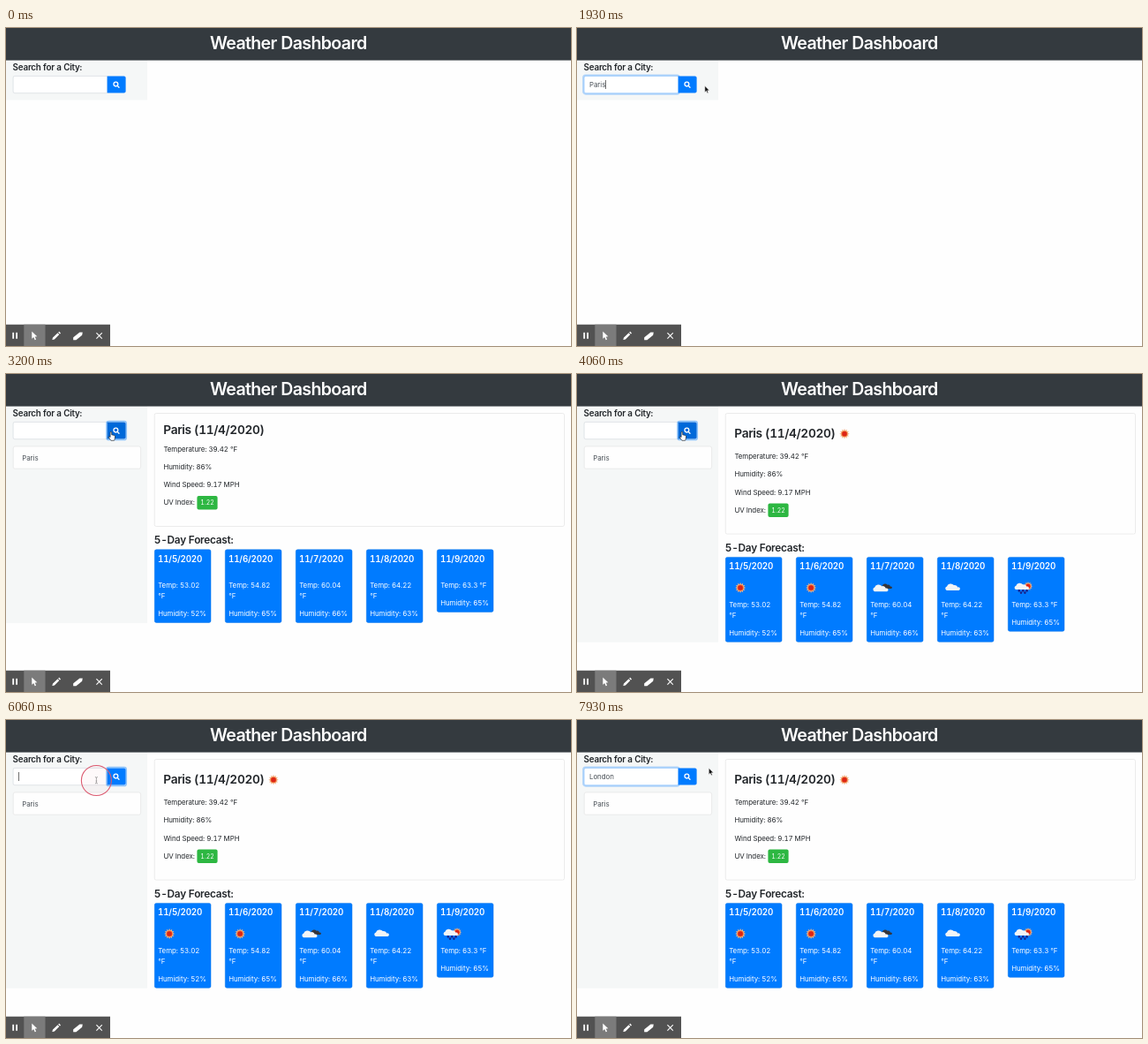
An HTML page that plays this animation: 640 px wide and 360 px high, repeating every 8000 ms.

```html
<!DOCTYPE html>
<html lang="en">
<head>
<meta charset="utf-8">
<title>Weather Dashboard</title>
<style>
html, body { margin: 0; width: 100%; height: 100%; overflow: hidden; background: #fefefe; }
svg { display: block; width: 640px; height: 360px; font-family: Inter, "Open Sans", sans-serif; font-variant-numeric: tabular-nums; fill: #212529; }
text { white-space: pre; }
.h1 { font-size: 19.6px; font-weight: 600; letter-spacing: -.66px; fill: #fff; text-anchor: middle; }
.h3 { font-size: 13.7px; font-weight: 600; letter-spacing: -.34px; }
.h4 { font-size: 11.8px; font-weight: 600; letter-spacing: -.24px; }
.h5 { font-size: 9.8px; font-weight: 600; letter-spacing: -.2px; }
.p { font-size: 7.9px; letter-spacing: -.05px; }
.w { fill: #fff; }
.box { fill: #fefefe; stroke: #dfdfdf; stroke-width: .6; }
</style>
</head>
<body>
<svg id="stage" viewBox="0 0 640 360">
  <defs>
    <g id="sun">
      <path id="rays" fill="#f3b184"/>
      <circle r="3.5" fill="#f0702c"/>
      <circle r="2.8" fill="#dc2418"/>
    </g>
    <path id="cloud" d="M-7 3.6a2.4 2.4 0 0 1 .2-4.6a4.5 3.9 0 0 1 8.1-1.4a3.3 2.8 0 0 1 4.3 2.4a2.2 1.9 0 0 1 1.5 3.6z"/>
  </defs>
  <rect width="640" height="360" fill="#fefefe"/>
  <rect id="side" y="36" width="160" height="45" fill="#f5f7f7"/>
  <rect width="640" height="36.6" fill="#343a3f"/>
  <text class="h1" x="319.8" y="23.6">Weather Dashboard</text>
  <text class="h5" x="7.6" y="47.9">Search for a City:</text>
  <rect id="field" x="8.1" y="54.4" width="107" height="19.3" rx="1.8" fill="#fff" stroke-width=".6"/>
  <rect id="fieldGlow" x="7" y="53.3" width="109" height="21.5" rx="2.8" fill="none" stroke="#007bff" stroke-opacity=".28" stroke-width="1.7"/>
  <text id="typed" class="p" x="14" y="67" style="fill:#495057"></text>
  <rect id="caret" y="59" width=".7" height="10" fill="#333"/>
  <rect id="btnGlow" x="113.9" y="53.5" width="22.4" height="21" rx="2.6" fill="none" stroke="#268fff" stroke-opacity=".5" stroke-width="1.5"/>
  <path id="btn" d="M114.6 54.4h19a2 2 0 0 1 2 2v15.2a2 2 0 0 1-2 2h-19z"/>
  <g fill="none" stroke="#fff" stroke-width="1.3" stroke-linecap="round"><circle cx="124.4" cy="63.6" r="2.4"/><path d="M126.3 65.5l1.7 1.7"/></g>
  <g id="list">
    <rect class="box" x="8.2" y="82" width="144.4" height="25.2" rx="2"/>
    <text class="p" x="18.2" y="97.5" style="fill:#495057">Paris</text>
  </g>
  <g id="now"></g>
  <g id="days"></g>
  <g id="bar">
    <rect y="335.7" width="118" height="24.3" fill="#525252"/>
    <rect x="20.3" y="335.7" width="24.2" height="24.3" fill="#7b7b7b"/>
    <g fill="#fff">
      <path d="M7.3 344.8h1.8v7h-1.8zM11.2 344.8h1.8v7h-1.8z"/>
      <path d="M29.3 343.5v8.2l2-1.7 1.4 3.2 1.4-.6-1.4-3.1 2.6-.3z"/>
      <path d="M52.3 353l.7-2.6 5.5-5.2 1.8 1.9-5.4 5.3zM59.2 344.5l1-.9 1.8 1.8-1 1z"/>
      <path d="M76.2 350.2l7.2-5.6h3.4l-.6 3.2-6.8 5.4h-3.2z"/>
    </g>
    <path d="M102.4 345.2l6.4 6.4m0-6.4l-6.4 6.4" stroke="#fff" stroke-width="1.1"/>
  </g>
  <circle id="ring" r="17" fill="#e0506a" fill-opacity=".03" stroke="#dc5a70" stroke-width="1.1"/>
  <g id="cursor">
    <path id="arrow" d="M0 0v7.2l1.7-1.5 1.1 2.5 1.2-.5-1.1-2.4h2.3z" fill="#111" stroke="#fff" stroke-width=".5"/>
    <path id="beam" d="M-1.5-4q1.5 0 1.5 1.2v5q0 1.2-1.5 1.2M1.5-4q-1.5 0-1.5 1.2m0 5q0 1.2 1.5 1.2M-.8.6h1.6" fill="none" stroke="#777" stroke-width=".6"/>
    <path id="hand" d="M-.9.2q.9-.9 1.6 0v3l3 .7q1 .4.9 1.4l-.5 3.2-.6 1.2h-3.6l-2.6-3.6q-.3-1.1.6-1l1.2.9z" fill="#fff" stroke="#111" stroke-width=".6"/>
  </g>
</svg>
<script>
const LOOP = 8000, LIST = 2730, NOW = 2800, DAYS = 2930, UV = 3200, ICONS = 3800;
const CLICKS = [460, 2330, 6060];
const $ = id => document.getElementById(id);
const show = (id, on) => $(id).setAttribute("display", on ? "inline" : "none");
const set = (id, attrs) => { for (const k in attrs) $(id).setAttribute(k, attrs[k]); };
const text = (cls, x, y, s) => `<text class="${cls}" x="${x}" y="${y}">${s}</text>`;
const use = (id, x, y, extra = "") => `<use href="#${id}" transform="translate(${x} ${y}) ${extra}"/>`;

const words = [
  { text: "Paris", keys: [1000, 1200, 1330, 1530, 1660], end: LIST },
  { text: "London", keys: [6730, 6860, 7000, 7200, 7330, 7400], end: LOOP }
];
// time, x, y of the pointer
const path = [
  [60, 128, 59], [200, 128, 59], [400, 102, 66], [1530, 102, 66], [1800, 144.8, 65.5],
  [2060, 144.8, 65.5], [2270, 119, 65.6], [5800, 119, 65.6], [5990, 102.4, 68.5],
  [7500, 102.4, 68.5], [7860, 149.3, 54.5], [LOOP, 149.3, 54.5]
];
const forecast = [
  ["11/5/2020", "53.02", 52, "sun"], ["11/6/2020", "54.82", 65, "sun"],
  ["11/7/2020", "60.04", 66, "broken"], ["11/8/2020", "64.22", 63, "cloud"],
  ["11/9/2020", "63.3", 65, "rain"]
];

let rays = "";
for (let i = 0; i < 24; i++) {
  const r = i % 2 ? 4 : 6, a = i * Math.PI / 12;
  rays += (i ? "L" : "M") + (r * Math.sin(a)).toFixed(2) + " " + (-r * Math.cos(a)).toFixed(2);
}
$("rays").setAttribute("d", rays + "z");

function icon(kind, x, y) {
  const white = (dx, dy, s = 1) => `<g fill="#f3f4f6">${use("cloud", x + dx, y + dy, `scale(${s})`)}</g>`;
  if (kind === "sun") return use("sun", x + .3, y);
  if (kind === "cloud") return white(.8, -.6, .97);
  if (kind === "broken")
    return `<g fill="#35353b">${use("cloud", x + 6, y - 1.5, "scale(.72)")}</g>` + white(-.8, .6);
  let drops = "";
  for (let i = 0; i < 5; i++)
    drops += `<ellipse cx="${x - 4 + i * 2.2}" cy="${y + (i % 2 ? 5.6 : 3.2)}" rx="1.2" ry="1.5"/>`;
  return use("sun", x + 6.2, y - 1.8, "scale(.85)") + white(-1, -1.4, .95) + `<g fill="#19248c">${drops}</g>`;
}

function nowCard(uv, icons) {
  const d = icons ? 8.6 : 0, line = i => 87.6 + i * 20.2 + d;
  let s = `<rect class="box" x="168.2" y="44.5" width="464.3" height="${(uv ? 128 : 97) + d}" rx="2"/>`;
  s += text("h3", 178.3, icons ? 71.8 : 68, "Paris (11/4/2020)");
  if (icons) s += use("sun", 303, 67.7, "scale(.95)");
  ["Temperature: 39.42 °F", "Humidity: 86%", "Wind Speed: 9.17 MPH"]
    .forEach((t, i) => s += text("p", 178.4, line(i), t));
  if (uv) s += text("p", 178.4, line(3) + .2, "UV Index:") +
    `<rect x="216.4" y="${138 + d}" width="23.2" height="15.4" rx="2" fill="#2db742"/>` +
    `<text class="w" x="228.1" y="${148.4 + d}" font-size="7" text-anchor="middle">1.22</text>`;
  return s;
}

function dayCards(uv, icons) {
  const top = 198.6 + (uv ? 0 : -31) + (icons ? 8.6 : 0), gap = icons ? 13.3 : 0;
  let s = text("h4", 167.8, top - 6.6, "5-Day Forecast:");
  forecast.forEach(([date, temp, hum, kind], i) => {
    const x = 168 + i * 80, last = i === 4, h = (last ? 70.6 : 82.6) + gap;
    const y = top + 43.6 + gap;
    s += `<rect x="${x + .3}" y="${top + .2}" width="63.7" height="${h}" rx="2" fill="#007bff" stroke="#0070e8" stroke-width=".5"/>`;
    s += text("h5 w", x + 4.1, top + 14, date);
    s += text("p w", x + 4.2, y, `Temp: ${temp}${last ? " °F" : ""}`);
    if (!last) s += text("p w", x + 4.2, y + 11.8, "°F");
    s += text("p w", x + 4.2, y + (last ? 19.6 : 31.6), `Humidity: ${hum}%`);
    if (icons) s += icon(kind, x + 16.8, top + 34.8);
  });
  return s;
}

let phase = "";
function results(t) {
  const uv = t >= UV, icons = t >= ICONS, key = `${t >= NOW}${t >= DAYS}${uv}${icons}`;
  if (key === phase) return;
  phase = key;
  $("now").innerHTML = t >= NOW ? nowCard(uv, icons) : "";
  $("days").innerHTML = t >= DAYS ? dayCards(uv, icons) : "";
}

function pointer(t) {
  let i = 0;
  while (i < path.length - 2 && t >= path[i + 1][0]) i++;
  const [t0, x0, y0] = path[i], [t1, x1, y1] = path[i + 1];
  const k = Math.max(0, Math.min(1, (t - t0) / (t1 - t0))), e = k * k * (3 - 2 * k);
  return [x0 + (x1 - x0) * e, y0 + (y1 - y0) * e];
}

function draw(t) {
  const [first, second, third] = CLICKS;
  const word = words.find(w => t < w.end) || words[1];
  const count = word.keys.filter(k => t >= k).length;
  const typing = (t >= first && t < second) || t >= third;
  const focusAt = t >= third ? third : first;
  const glow = typing ? Math.min(1, (t - focusAt) / 150) : 0;
  const [x, y] = pointer(t);
  const over = t >= 200 && x > 114 && x < 136 && y > 54 && y < 74;
  const btnFocus = t >= second && t < third + 60;

  $("typed").textContent = word.text.slice(0, count);
  const lastKey = Math.max(focusAt, ...word.keys.filter(k => t >= k));
  show("caret", typing && (t - lastKey) % 1000 < 500);
  set("caret", { x: 14 + (count ? $("typed").getComputedTextLength() - .2 : .2) });
  set("field", { stroke: glow > .4 ? "#80bdff" : "#ced4da" });
  set("fieldGlow", { opacity: glow });
  set("btnGlow", { opacity: btnFocus ? 1 : 0 });
  set("btn", { fill: over ? "#0069d9" : "#007bff" });

  show("list", t >= LIST);
  results(t);
  const bottom = t < LIST ? 81.5 : t < DAYS ? 142 : t < UV ? 251 : t < ICONS ? 282 : 303.6;
  set("side", { height: bottom - 36 });

  const hit = CLICKS.find(c => t >= c && t < c + 200);
  show("ring", hit !== undefined);
  if (hit !== undefined) {
    const [cx, cy] = pointer(hit);
    set("ring", { cx, cy, opacity: 1 - Math.max(0, t - hit - 70) / 130 });
  }
  show("cursor", t >= 60);
  set("cursor", { transform: `translate(${x} ${y})` });
  const inField = x < 114 && y > 54 && y < 74;
  show("beam", inField);
  show("hand", !inField && x < 136);
  show("arrow", !inField && x >= 136);
}

const start = performance.now();
function tick() {
  draw((performance.now() - start) % LOOP);
  requestAnimationFrame(tick);
}
tick();
</script>
</body>
</html>
```
